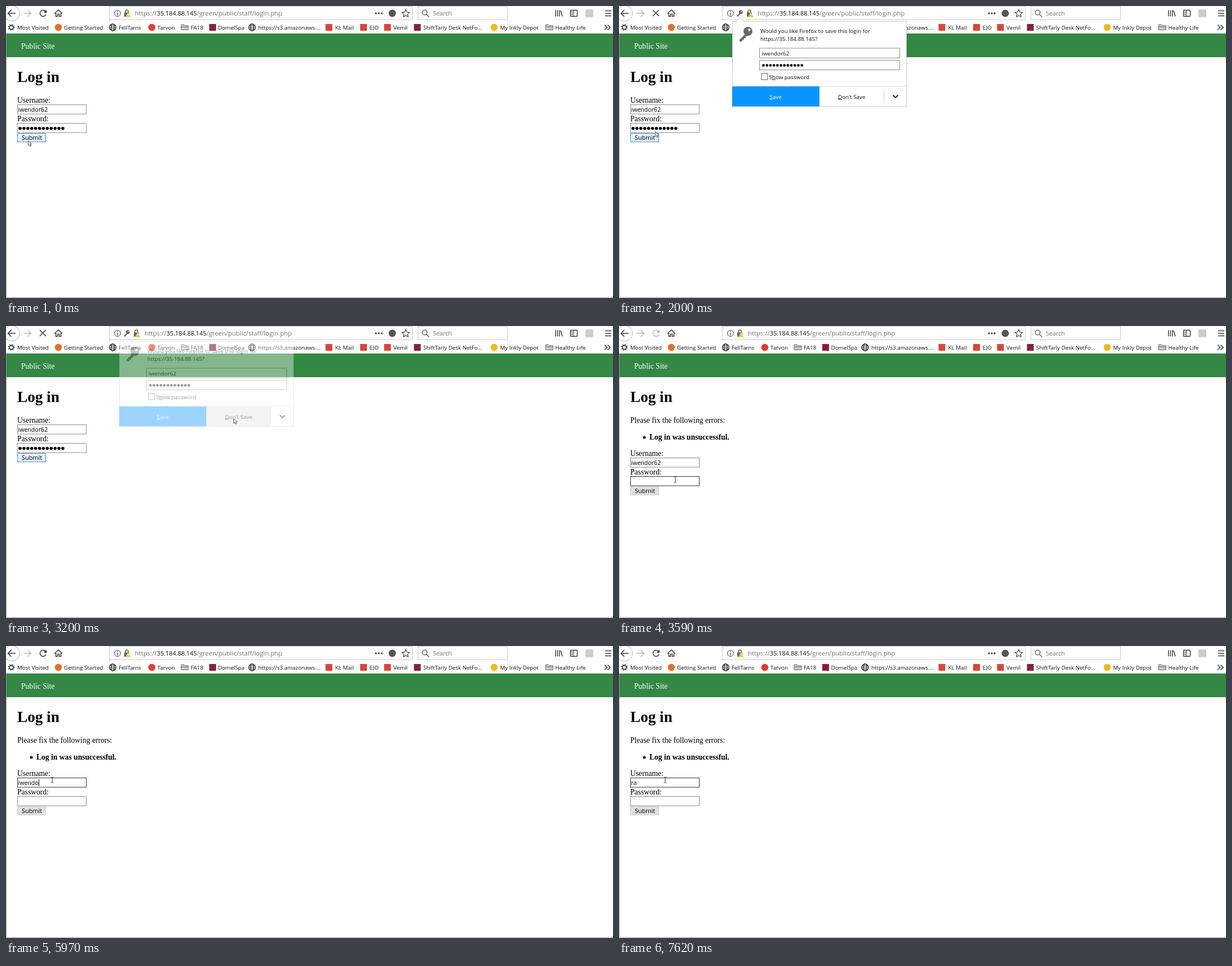
These frames come from a looping animation (1078x519 px, 8 s). An HTML page:

```html
<!DOCTYPE html>
<html lang="en">
<head>
<meta charset="utf-8">
<title>Log in</title>
<style>
  html, body { margin: 0; width: 100%; height: 100%; overflow: hidden; background: #fff; }
  svg { display: block; font: 9.8px "Open Sans", "Noto Sans", sans-serif; fill: #111; }
  .page { font: 13.6px "Liberation Serif", serif; fill: #000; }
  .page .ui { font: 10.6px "Open Sans", "Noto Sans", sans-serif; }
  .line { fill: none; stroke: #3c3c3c; stroke-width: 1.5; }
  .box { fill: #fff; stroke: #8c8c8c; }
  .edge { fill: #fff; stroke: #cbcbcb; }
</style>
</head>
<body>
<svg width="1078" height="519" viewBox="0 0 1078 519">
  <defs>
    <g id="globe" class="line" stroke-width="1.2">
      <circle r="6"/><ellipse rx="2.7" ry="6"/><path d="M-6 0H6M-5-3H5M-5 3H5" stroke-width="1"/>
    </g>
    <g id="gear" class="line">
      <circle r="3.4" stroke-width="1.6"/><circle r="5" stroke-width="2" stroke-dasharray="1.8 2.127"/>
    </g>
    <path id="folder" d="M-6.5 4.5V-5H-1.5L0-3H6.5V4.5ZM-6.5-1H6.5" fill="#c9c9c9" stroke="#707070"/>
    <g id="key" fill="#6a6a6a">
      <path d="M2-2-10 10v3h5v-3h3V7h3V4h3z"/><circle cx="5" cy="-5" r="8"/>
      <circle cx="7.5" cy="-7.5" r="2.2" fill="#fff"/>
    </g>
  </defs>

  <!-- toolbar -->
  <path d="M0 48.5H1078" stroke="#e4e4e4"/>
  <circle class="line" cx="10" cy="13" r="14" style="stroke:#b4b4b4;stroke-width:1"/>
  <path class="line" d="M17 13H4M9.500 7 3.500 13l6 6"/>
  <path class="line" d="M31 13H44M38.500 7l6 6-6 6" style="stroke:#b8b8b8"/>
  <g id="reload"><path class="line" d="M70.500 10A5.500 5.500 0 1 0 71 15" style="stroke:inherit"/><path d="M72 6.500V12H66.500z" stroke="none"/></g>
  <path id="stop" class="line" d="M60 7 71 18M71 7 60 18"/>
  <path class="line" d="M86 13.500 93 7l7 6.500M88.500 12.500V18.500H91.500V14.500H94.500V18.500H97.500V12.500"/>

  <rect class="edge" x="183.500" y=".5" width="538" height="24"/>
  <circle class="line" cx="198" cy="13" r="5.500" style="stroke-width:1"/>
  <path d="M198 9.500v1.500M198 12v4.500" stroke="#444" stroke-width="1.300"/>
  <use id="smallKey" href="#key" transform="translate(214 13) scale(.45)"/>
  <g id="address" font-size="11.300" fill="#777">
    <path class="line" d="M212 12V9.500a2.500 2.500 0 0 1 5 0V12" style="stroke:#666"/>
    <rect x="210" y="11.500" width="9" height="7.500" fill="#666"/>
    <path d="M217 11.500 222 20H212z" fill="#ffbf00" stroke="#fff" stroke-width=".5"/>
    <path d="M217 14v3M217 18v1" stroke="#fff"/>
    <text x="229" y="17">https://</text>
    <text x="268" y="17" font-size="10.900" fill="#111">35.184.88.145</text>
    <text x="339" y="17">/green/public/staff/login.php</text>
  </g>
  <g fill="#444"><circle cx="657" cy="13" r="1.700"/><circle cx="662" cy="13" r="1.700"/><circle cx="667" cy="13" r="1.700"/></g>
  <circle cx="686" cy="13" r="6.500" fill="#555"/>
  <path class="line" d="M710 6.500l2 4.300 4.600.6-3.400 3.200.9 4.600-4.100-2.300-4.100 2.300.9-4.600-3.400-3.200 4.600-.6z" style="stroke-width:1.200"/>
  <rect class="edge" x="731.500" y=".5" width="159" height="24"/>
  <path class="line" d="M746.500 14.500l5 5" style="stroke:#666"/><circle class="line" cx="743.500" cy="11.500" r="4.300" style="stroke:#666"/>
  <text x="758" y="17" font-size="10.750" fill="#777">Search</text>
  <path class="line" d="M976 7.500V18.500M979.500 7.500V18.500M983 7.500V18.500M985 8l3 10.500"/>
  <rect class="line" x="1002.500" y="7.500" width="12" height="11" rx="1.500"/><path class="line" d="M1008 8V18M1004 10.500h3M1004 13h3M1004 15.500h3" style="stroke-width:1"/>
  <rect x="1029" y="6" width="14" height="14" rx="2" fill="#ccc"/>
  <path class="line" d="M1064 8.500h11M1064 13h11M1064 17.500h11"/>
  <g id="bookmarks"></g>
  <path class="line" d="M1063 33.500l4.500 4.500-4.500 4.500M1068.500 33.500l4.500 4.500-4.500 4.500"/>

  <!-- page -->
  <g class="page">
    <rect y="49" width="1078" height="42" fill="#338843"/>
    <path d="M.5 49V518.500H1078" fill="none" stroke="#9a9a9a"/>
    <text x="27" y="76" fill="#fff">Public Site</text>
    <text x="20" y="135" font-size="27.200" font-weight="bold">Log in</text>
    <g id="errors">
      <text x="20" y="172">Please fix the following errors:</text>
      <circle cx="45" cy="198" r="2.500"/>
      <text x="54" y="202" font-weight="bold">Log in was unsuccessful.</text>
    </g>
    <g id="form">
      <text x="20" y="172">Username:</text>
      <rect id="userBox" class="box" x="20.500" y="175.500" width="122" height="16.500"/>
      <text id="user" class="ui" x="21.500" y="188"></text>
      <path id="caret" d="M0 178V190" stroke="#000"/>
      <text x="20" y="205">Password:</text>
      <rect id="passBox" class="box" x="20.500" y="208.500" width="122" height="16.500"/>
      <g id="passDots"></g>
      <rect id="submit" x="20.500" y="226.500" width="50" height="15"/>
      <text class="ui" x="28" y="238" style="font-size:10.900px">Submit</text>
    </g>
  </g>

  <!-- save-login panel -->
  <g id="popup">
    <path class="edge" d="M201.500 27.500H208L215 20.500 222 27.500H510.500V178.500H201.500z"/>
    <use href="#key" transform="translate(224 50)"/>
    <text x="251" y="48">Would you like Firefox to save this login for</text>
    <text x="251" y="62">https://35.184.88.145?</text>
    <rect class="box" x="249.500" y="75" width="249" height="17.500"/>
    <text id="savedUser" x="253.500" y="87.500"></text>
    <rect class="box" x="249.500" y="96.500" width="249" height="17"/>
    <g id="savedDots"></g>
    <rect class="box" x="253" y="120" width="11" height="11" style="stroke:#555"/>
    <text x="266.500" y="129.500">S<tspan text-decoration="underline">h</tspan>ow password</text>
    <path d="M202 142.500H510" stroke="#ddd"/>
    <rect x="201" y="143" width="155" height="35.500" fill="#0a95fd"/>
    <text x="267.500" y="164.500" fill="#fff"><tspan text-decoration="underline">S</tspan>ave</text>
    <rect id="dontSave" x="356.500" y="143" width="114.500" height="35.500" fill="#e4e4e4"/>
    <text x="389" y="164.500"><tspan text-decoration="underline">D</tspan>on't Save</text>
    <path d="M470.500 149V172" stroke="#d4d4d4"/>
    <path class="line" d="M486.500 158.500l4.500 4.500 4.500-4.500" style="stroke:#111;stroke-width:1.800"/>
  </g>

  <path id="arrow" d="M.5.5V9L2.500 7.200 4 10.700 5.500 10 4 6.700H6.500z" fill="#fff" stroke="#333" stroke-width=".8"/>
  <path id="beam" d="M-2.500-5H-.5L0-4.500.5-5H2.500M0-4.500V4.500M-2.500 5H-.5L0 4.500.5 5H2.500" fill="none" stroke="#333" stroke-width=".9"/>
</svg>
<script>
const LOOP = 8000, POPUP = 1350, FILLED = 2000, CLOSING = 3200, ERROR = 3330, LOADED = 3860, FOCUS = 5160;
const USER = 'iwendor62';
const $ = id => document.getElementById(id);
const show = (id, on) => $(id).style.display = on ? '' : 'none';
const move = (id, x, y) => $(id).setAttribute('transform', `translate(${x} ${y})`);
const at = (rows, t) => rows.findLast(row => row[0] <= t);

// icon centre, icon (symbol name or plain mark colour), label x, label
const bookmarks = [
  [9.5, 'gear', 20, 'Most Visited'], [93, '#e8702a', 103, 'Getting Started'],
  [189.5, 'globe', 200, 'FellTarns'], [259, '#e13f2b', 269, 'Tarvon'],
  [317.5, 'folder', 328, 'FA18'], [367, '#861f41', 376.5, 'DomelSpa', 1],
  [437, 'globe', 448, 'https://s3.amazonaws....'], [573.5, '#dc4437', 584.5, 'KL Mail', 1],
  [635, '#dc4437', 645.5, 'EJO', 1], [677.5, '#dc4437', 688, 'Vemil', 1],
  [730.5, '#861f41', 741, 'ShiftTarly Desk NetFo...', 1], [867, '#f3b61f', 877.5, 'My Inkly Depot'],
  [965, 'folder', 975.5, 'Healthy Life']
];
const icon = (x, kind, square) =>
  kind[0] != '#' ? `<use href="#${kind}" x="${x}" y="38"/>` :
  square ? `<rect x="${x - 6}" y="32" width="12" height="12" fill="${kind}"/>` :
  `<circle cx="${x}" cy="38" r="6.3" fill="${kind}"/>`;
$('bookmarks').innerHTML = bookmarks.map(([x, kind, textX, label, square]) =>
  icon(x, kind, square) + `<text x="${textX}" y="42">${label}</text>`).join('');

const dots = (n, x, y, gap, r) => Array.from({ length: n }, (_, i) =>
  `<circle cx="${x + i * gap}" cy="${y}" r="${r}"/>`).join('');
$('passDots').innerHTML = dots(12, 25, 217.5, 6.9, 2.8);

// time, x, y, text cursor
const pointer = [
  [0, 39, 239], [2000, 64, 223], [2140, 72, 221], [2400, 73, 221], [2540, 117, 212],
  [2690, 180, 200], [2810, 290, 178], [2940, 380, 166], [3060, 404, 164],
  [3470, 220, 232], [3590, 100, 273, 1], [3860, 110, 274, 1], [3990, 119, 275, 1],
  [4170, 116, 243, 1], [4290, 111, 190], [4560, 97, 227], [4720, 86, 237, 1], [4860, 82, 238, 1]
];
// time, characters left while erasing
const erased = [
  [0, 9], [5570, 8], [5690, 7], [5970, 6], [6090, 5], [6220, 4],
  [6610, 3], [6760, 2], [6890, 1], [7160, 0]
];
const typed = [[0, ''], [7470, 'r'], [7620, 'ra']];

function draw(t) {
  const failed = t >= ERROR, asking = t >= POPUP && !failed, filled = t >= FILLED;
  const [, x, y, beam] = at(pointer, t);
  const shift = failed ? 59 : 0;

  show('stop', asking);
  show('reload', !asking);
  const reloadColour = failed && t < LOADED ? '#bbb' : '#3c3c3c';
  $('reload').setAttribute('fill', reloadColour);
  $('reload').setAttribute('stroke', reloadColour);
  show('smallKey', asking);
  move('address', asking ? 17 : 0, 0);

  show('popup', asking);
  move('popup', 0, filled ? 0 : -2);
  $('popup').style.opacity = !filled ? .31 : t < CLOSING ? 1 : .4;
  $('savedUser').textContent = filled ? USER : 'iwadels';
  $('savedDots').innerHTML = dots(filled ? 12 : 5, 256.5, 105.5, 6.2, 2.4);
  show('dontSave', x > 356 && x < 471 && y > 143 && y < 178);

  show('errors', failed);
  move('form', 0, shift);
  show('passDots', !failed);
  const hover = top => beam && x < 143 && y >= top + shift && y <= top + 17 + shift;
  $('userBox').style.stroke = hover(175) || t >= FOCUS ? '#333' : '';
  $('passBox').style.stroke = hover(208) ? '#333' : '';
  $('submit').setAttribute('fill', failed ? '#e1e1e1' : '#e5f1fb');
  $('submit').setAttribute('stroke', failed ? '#cfcfcf' : '#3d97e0');
  $('user').textContent = USER.slice(0, at(erased, t)[1]) + at(typed, t)[1];
  show('caret', t >= FOCUS && t < 7470);
  move('caret', Math.round(21.5 + $('user').getComputedTextLength()) + .5, 0);

  show('arrow', !beam);
  show('beam', beam);
  move(beam ? 'beam' : 'arrow', x, y);
}

function tick() {
  draw(performance.now() % LOOP);
  requestAnimationFrame(tick);
}
tick();
</script>
</body>
</html>
```
